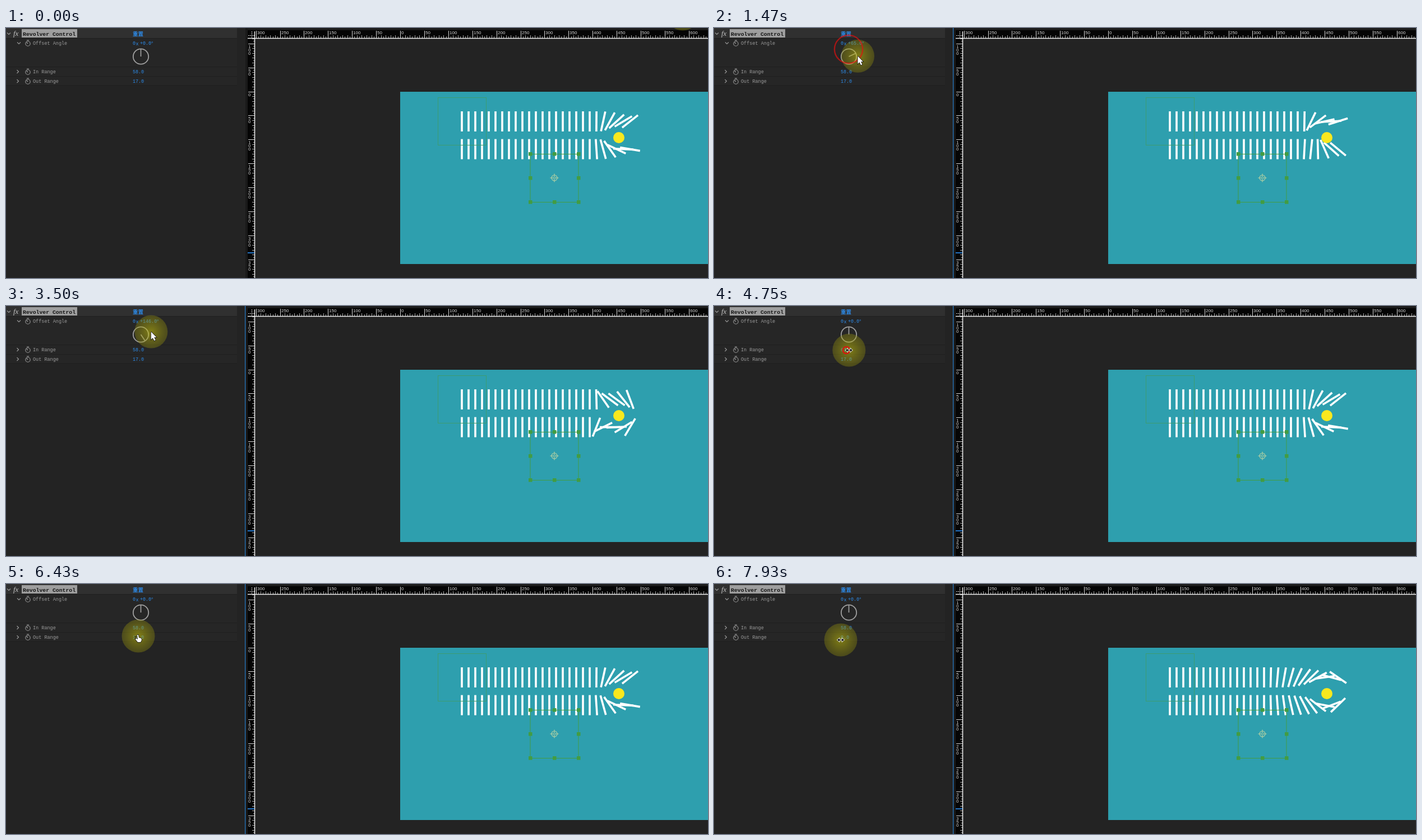
An HTML page with a canvas for the animation above (8 s loop, 1252x447 px).

```html
<!DOCTYPE html>
<html lang="en">
<head>
<meta charset="utf-8">
<title>Offset angle and range controls</title>
<style>
html, body { margin: 0; width: 100%; height: 100%; overflow: hidden; background: #232323; }
canvas { display: block; }
</style>
</head>
<body>
<canvas id="stage" width="1252" height="447"></canvas>
<script>
const c = document.getElementById('stage').getContext('2d');
const LOOP = 8000, LAG = 140, UNIT = 0.858;
const MONO = '"Liberation Mono", monospace', SANS = '"Liberation Sans", sans-serif';
const BLUE = '#2d8ceb', GREY = '#9a9a9a', GREEN = '#429c42';
const SUN = { x: 1093, y: 196 }, DIAL = { x: 240.5, y: 51 };
const TURN = { start: 1100, end: 4040 }, IN = { start: 4690, end: 5980 }, OUT = { start: 6640, end: 7790 };

const rad = deg => deg * Math.PI / 180;
const mix = (a, b, u) => a + (b - a) * u;
const part = (t, a, b) => Math.max(0, Math.min(1, (t - a) / (b - a)));
const ease = (t, a, b) => { const u = part(t, a, b); return u * u * (3 - 2 * u); };

// Direction of the hand around the dial: out clockwise, then back
const turns = [
  [TURN.start, 0], [1230, 50], [1370, 65], [1470, 87], [2000, 157], [2240, 222],
  [2400, 285], [3260, 186], [3400, 147], [3500, 75], [TURN.end, 0]
];

function turnAt(t) {
  const i = turns.findIndex(k => k[0] > t);
  if (i < 1) return 0;
  const [a, b] = [turns[i - 1], turns[i]];
  return mix(a[1], b[1], part(t, a[0], b[0]));
}

const inDrag = t => 84 * Math.sin(Math.PI * part(t, IN.start, IN.end)) ** 1.5;
const outDrag = t => 111 * Math.sin(Math.PI / 2 * part(t, OUT.start, OUT.end));
const outReturn = t => part(t, OUT.end, 7930);

const settings = t => [
  turnAt(t - 100),
  58 + inDrag(t),
  17 + outDrag(t) - 128 * outReturn(t)
];

function pointerAt(t) {
  if (t < TURN.start) {
    const u = ease(t, 70, 950);
    return [mix(1207, 240, u), mix(-25, 38, u) + 40 * Math.sin(Math.PI * u)];
  }
  if (t < TURN.end) {
    const a = rad(turnAt(t));
    const r = 13 + 20 * Math.sin(Math.PI * part(t, TURN.start, TURN.end)) ** 2;
    return [DIAL.x + r * Math.sin(a), DIAL.y - r * Math.cos(a)];
  }
  const down = ease(t, TURN.end, 4400);
  return [
    240 - 4 * down + inDrag(t) + outDrag(t) - 121 * outReturn(t),
    38 + 41 * down + 14 * ease(t, 6220, 6400) + 7 * ease(t, OUT.start, 7200)
  ];
}

function rect(x, y, w, h, color) {
  c.fillStyle = color;
  c.fillRect(x, y, w, h);
}

function line(color, width, ...pts) {
  c.strokeStyle = color;
  c.lineWidth = width;
  c.beginPath();
  for (let i = 0; i < pts.length; i += 2) c.lineTo(pts[i], pts[i + 1]);
  c.stroke();
}

function ring(x, y, r, color, width) {
  c.strokeStyle = color;
  c.lineWidth = width;
  c.beginPath();
  c.arc(x, y, r, 0, 7);
  c.stroke();
}

function disc(x, y, r, fill) {
  c.fillStyle = fill;
  c.beginPath();
  c.arc(x, y, r, 0, 7);
  c.fill();
}

function text(s, x, y, color, font) {
  c.fillStyle = color;
  c.font = font;
  c.fillText(s, x, y);
}

// Draws at a place with an optional clockwise turn
function placed(x, y, angle, paint) {
  c.save();
  c.translate(x, y);
  c.rotate(angle);
  paint();
  c.restore();
}

function chevron(x, y, open) {
  placed(x, y, open ? Math.PI / 2 : 0, () => line(GREY, 1.1, -1.5, -3, 1.5, 0, -1.5, 3));
}

function label(name, y, open) {
  chevron(open ? 23 : 21, y, open);
  ring(39, y + 1, 4.2, GREY, 1.1);
  line(GREY, 1.1, 37, y - 5, 41, y - 5);
  line(GREY, 1.1, 36.5, y - 1.5, 39, y + 1);
  text(name, 48, y + 3, GREY, '8.5px ' + MONO);
}

function panel(offset, inner, outer) {
  const font = '8.4px ' + MONO, number = v => Math.round(v) + '.0';
  rect(0, 0, 412, 18, '#303030');
  rect(0, 18, 412, 85, '#262626');
  for (const y of [18, 69, 86, 102]) rect(0, y, 412, 1, '#1f1f1f');
  rect(28, 2, 99, 15, '#9e9e9e');
  chevron(5, 10, true);
  text('fx', 13, 14, '#c4c4c4', 'italic 13px "Liberation Serif", serif');
  text('Revolver Control', 30, 13.5, '#141414', 'bold 9.8px ' + MONO);
  text('重置', 226, 14, BLUE, 'bold 9.5px "Noto Sans CJK SC", "Noto Sans CJK", sans-serif');
  label('Offset Angle', 27, true);
  label('In Range', 78);
  label('Out Range', 95);

  const angle = '+' + number(offset);
  text('0', 226, 30, BLUE, font);
  text('x', 231.5, 31, BLUE, font);
  text(angle, 239, 30, BLUE, font);
  text('°', 238 + angle.length * 5.04, 30, BLUE, font);
  text(number(inner), 226, 81, BLUE, font);
  text(number(outer), 226, 98, BLUE, font);

  ring(DIAL.x, DIAL.y, 13.7, '#a0a0a0', 1.8);
  placed(DIAL.x, DIAL.y, rad(offset), () => line('#a0a0a0', 1.7, 0, 0, 0, -13));
}

function rulers() {
  const white = '#d8d8d8', font = '8px ' + SANS;
  rect(427, 0, 4, 447, '#191919');
  rect(431, 0, 821, 19, '#050505');
  rect(431, 0, 13, 447, '#050505');
  rect(431, 0, 821, 4, '#1c1c1c');
  for (let u = -300; u <= 640; u += 5) {
    const x = Math.round(703 + u * UNIT) + 0.5, major = u % 50 === 0;
    line(major ? white : '#a8a8a8', 1, x, major ? 5 : u % 10 ? 15 : 13, x, 18);
    if (major) text(Math.abs(u), x + 1.5, 11, white, font);
  }
  for (let u = -110; u <= 385; u += 5) {
    const y = Math.round(113.5 + u * UNIT) + 0.5, major = u % 50 === 0;
    line(major ? white : '#a8a8a8', 1, major ? 432 : u % 10 ? 441 : 439, y, 443, y);
    if (major) [...String(Math.abs(u))].forEach((d, i) => text(d, 432, y + 7 + i * 6, white, font));
  }
  rect(431, 4, 13, 14, '#050505');
  c.setLineDash([2, 1]);
  line(white, 1, 432, 13.5, 443, 13.5);
  line(white, 1, 438.5, 6, 438.5, 18);
  c.setLineDash([]);
  line('#f0f0f0', 1.3, 431, 18.5, 1252, 18.5);
  line('#f0f0f0', 1.5, 443.5, 6, 443.5, 447);
  rect(431, 401, 12, 2, '#2474c4');
}

// Each bar turns to face the sun, less so with distance
function bars(offset, inner, outer) {
  const lo = Math.min(inner, outer), hi = Math.max(inner, outer);
  for (const y of [167, 216.6]) {
    for (let x = 813; x <= 1113; x += 12) {
      const dx = SUN.x - x, dy = SUN.y - y;
      const pull = 1 - part(Math.hypot(dx, dy) / UNIT, lo, hi);
      const full = Math.atan2(dy, dx) + rad(offset);
      const wrapped = full - 2 * Math.PI * Math.round(full / (2 * Math.PI));
      placed(x, y, wrapped * pull, () => rect(-1.8, -18, 3.6, 36, '#fff'));
    }
  }
}

function controls() {
  c.strokeStyle = '#3d9c70';
  c.lineWidth = 1;
  c.strokeRect(770.5, 124.5, 86, 85);
  c.strokeStyle = GREEN;
  c.strokeRect(935, 225.5, 86, 86);
  const ink = '#b9d3a2';
  for (const i of [-1, 0, 1])
    for (const j of [-1, 0, 1])
      if (i || j) rect(975 + 43 * i, 265 + 43 * j, 6.5, 6.5, GREEN);
  ring(978, 268, 5, ink, 1.1);
  ring(978, 268, 2, ink, 1);
  for (let k = 0; k < 4; k++)
    placed(978, 268, k * Math.PI / 2, () => line(ink, 1.1, 0, -7.5, 0, -3));
}

function shape(fill, stroke, ...pts) {
  line(stroke, 1.4, ...pts, pts[0], pts[1]);
  c.fillStyle = fill;
  c.fill();
}

function arrow() {
  shape('#fff', '#111', 0, 0, 0, 14, 3, 11, 5.5, 16, 8, 15, 5.5, 10, 9.5, 10);
}

function hand() {
  shape('#fff', '#111', -2, -2, 0, -2, 1, 3, 5, 4, 6, 7, 4, 11, -1, 11, -5, 6, -4, 4, -1, 6);
  line('#111', 1, -7, 1, -3, 1);
  line('#111', 1, -7, 4, -4, 4);
}

function scrub() {
  for (const side of [0, Math.PI])
    placed(0, 0, side, () => shape('#111', '#fff', 0, -0.8, 2.5, -0.8, 2.5, -3, 6, 0, 2.5, 3, 2.5, 0.8, 0, 0.8));
}

function ripple(t, start, x, y) {
  const age = t - start;
  if (age > 0 && age < 300) ring(x, y, age / 10, `rgba(225,15,15,${1 - age / 800})`, 2.4);
}

function drawPointer(t) {
  const [x, y] = pointerAt(t);
  const glow = c.createRadialGradient(x, y, 0, x, y, 29.5);
  glow.addColorStop(0, 'rgba(205,200,10,.55)');
  glow.addColorStop(1, 'rgba(150,146,12,.35)');
  disc(x, y, 29.5, glow);

  ripple(t, 1220, 240, 38);
  ripple(t, IN.start, 236, 79);
  ripple(t, OUT.start, 236, 93);

  const scrubbing = t >= IN.start && t < IN.end || t >= OUT.start;
  placed(x, y, 0, t < 4210 ? arrow : scrubbing ? scrub : hand);
}

function draw(now) {
  const t = now % LOOP;
  rect(0, 0, 1252, 447, '#232323');
  panel(...settings(t));
  rulers();
  if (t >= TURN.start) rect(426, 0, 1.3, 447, '#2878c0');
  rect(703, 114, 549, 308, '#2e9fae');
  // The preview trails the panel slightly
  bars(...settings(t - LAG));
  disc(SUN.x, SUN.y, 10, '#f9e81e');
  controls();
  drawPointer(t);
}

const begin = performance.now();
function tick() {
  draw(performance.now() - begin);
  requestAnimationFrame(tick);
}
tick();
</script>
</body>
</html>
```
